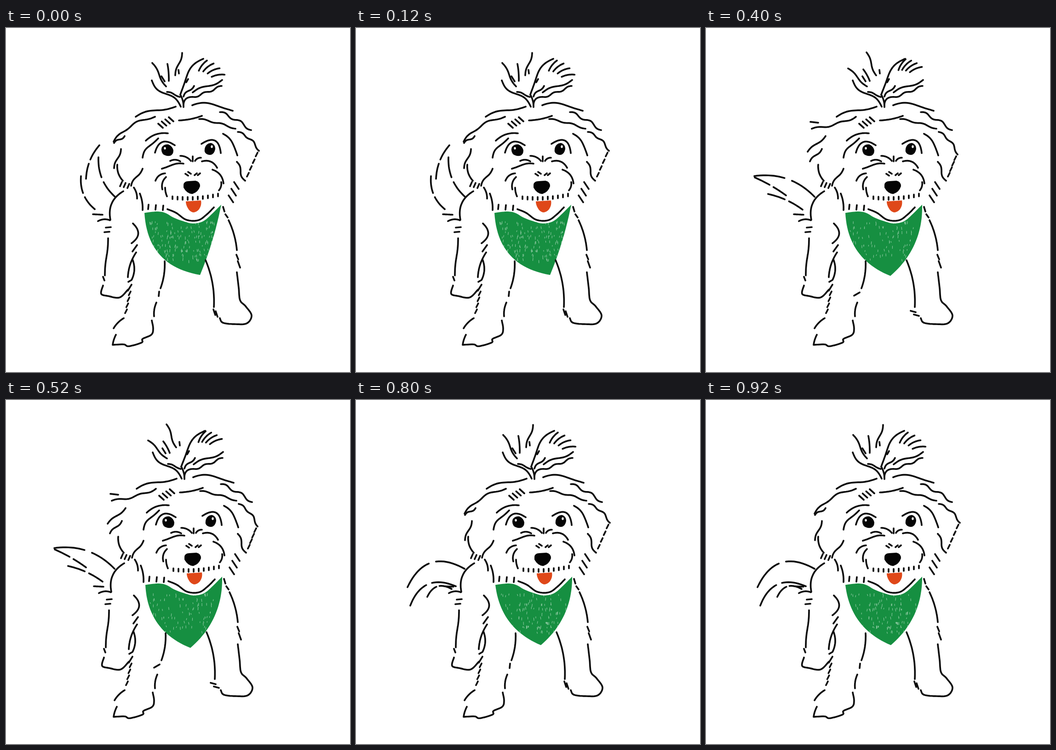
Animation of 748x748 px, one loop 1000 ms. Source, as an HTML page:

```html
<!DOCTYPE html>
<html lang="en">
<head>
<meta charset="utf-8">
<title>Dog wagging its tail</title>
<style>
html, body { margin: 0; width: 100%; height: 100%; overflow: hidden; background: #fff; }
svg { display: block; width: 100%; height: 100%; }
.ink { fill: none; stroke: #0c0c0c; stroke-width: 3.7; stroke-linecap: round; stroke-linejoin: round; }
.chalk { fill: none; stroke: #a9d8b8; stroke-width: 1.1; stroke-linecap: round; opacity: .8; }
</style>
</head>
<body>
<svg viewBox="0 0 748 748">
  <defs><clipPath id="cut"><path id="edge"/></clipPath></defs>
  <g id="dog">
    <path id="scarf" fill="#168f41"/>
    <path id="chalk" class="chalk" clip-path="url(#cut)"/>
    <path id="still" class="ink"/>
    <path id="moving" class="ink"/>
    <g fill="#050505">
      <path d="M341 259Q346 252 355 253Q364 257 366 266Q366 276 358 278Q349 279 343 274Q338 267 341 259Z"/>
      <path d="M436 257Q440 250 448 250Q457 253 457 263Q455 275 446 276Q437 276 434 269Q433 262 436 257Z"/>
      <path d="M388 341Q389 333 399 333L414 332Q424 334 424 344Q420 357 407 361Q395 360 388 347Z"/>
    </g>
    <g fill="#fff">
      <ellipse cx="347.5" cy="261.5" rx="2.2" ry="2.8"/>
      <ellipse cx="449.5" cy="258" rx="2.2" ry="3"/>
    </g>
    <path fill="#df4819" d="M393 377L426 375Q428 385 422 394Q416 401 409 401Q401 399 397 391Q393 384 393 377Z"/>
  </g>
</svg>
<script>
const el = id => document.getElementById(id);
const path = pts => "M" + pts.map(p => p.map(v => v.toFixed(1)).join(" ")).join("L");
const turn = Math.PI / 180;

// Points from one end to the other, bowed to the left of travel by `bow`,
// with `waves` ripples of height `amp`.
function line(x1, y1, x2, y2, bow = 0, waves = 0, amp = 2) {
  const dx = x2 - x1, dy = y2 - y1, len = Math.hypot(dx, dy), pts = [];
  for (let i = 0; i <= 24; i++) {
    const t = i / 24;
    const off = 4 * bow * t * (1 - t) + amp * Math.sin(2 * Math.PI * waves * t);
    pts.push([x1 + dx * t + off * dy / len, y1 + dy * t - off * dx / len]);
  }
  return pts;
}

const stroke = (...args) => path(line(...args));

// Equal ticks (dx, dy) whose starts run from one point to another.
function row(n, x1, y1, x2, y2, dx, dy, sag = 0) {
  let d = "";
  for (let i = 0; i < n; i++) {
    const t = i / (n - 1);
    const x = x1 + (x2 - x1) * t, y = y1 + (y2 - y1) * t + 4 * sag * t * (1 - t);
    d += path([[x, y], [x + dx, y + dy]]);
  }
  return d;
}

// Smooth curve through a few key points, given as "x,y x,y".
function smooth(text) {
  const p = text.split(" ").map(s => s.split(",").map(Number)), pts = [p[0]];
  for (let i = 0; i < p.length - 1; i++) {
    const a = p[i - 1] || p[i], b = p[i], c = p[i + 1], e = p[i + 2] || c;
    for (let t = 0.125; t <= 1; t += 0.125) {
      pts.push([0, 1].map(k => b[k] + t / 2 * (c[k] - a[k]
        + t * (2 * a[k] - 5 * b[k] + 4 * c[k] - e[k] + t * (3 * (b[k] - c[k]) + e[k] - a[k])))));
    }
  }
  return pts;
}

function head() {
  return stroke(319, 114, 382, 171, -1, -1, 6) + stroke(352, 139, 380, 150, 1, 1, 1)
    + stroke(381, 145, 388, 172, 2) + stroke(388, 172, 410, 150, 9)
    + stroke(410, 150, 471, 126, -1, -2) + stroke(388, 149, 411, 126, 1, 1)
    + stroke(408, 140, 472, 113, 0, 1, 3)
    + stroke(407, 168, 495, 180, 8, 1, 2.5) + stroke(378, 201, 428, 191, -2)
    + stroke(422, 198, 501, 219, 2, 2, 1.5) + stroke(467, 183, 535, 222, 3, 2, 3)
    + stroke(284, 193, 371, 171, 3, 1, 3) + row(4, 333, 208, 356, 194, 10, 9)
    + stroke(299, 306, 274, 343, -1, 1) + stroke(280, 347, 287, 371, 2)
    + stroke(293, 360, 299, 396, 2) + stroke(244, 297, 256, 332, -4)
    + row(3, 250, 344, 266, 348, 4, -9) + stroke(504, 291, 522, 332, -1, 1, 3);
}

function face() {
  return stroke(306, 245, 354, 229, 6) + stroke(299, 282, 333, 240, 5, 1)
    + stroke(326, 271, 369, 255, 16) + stroke(427, 252, 469, 272, 19)
    + stroke(474, 230, 505, 277, 6, 1, 1)
    + stroke(341, 306, 388, 295, 3, -1, 1) + stroke(359, 289, 381, 290, 3)
    + stroke(381, 278, 404, 289, 3) + stroke(408, 279, 408, 290)
    + stroke(413, 289, 426, 282, 2) + stroke(428, 290, 461, 304, 7)
    + stroke(327, 332, 348, 316, 4) + stroke(350, 324, 342, 351, -4)
    + stroke(348, 347, 352, 366, -1) + stroke(451, 308, 475, 338, 6)
    + stroke(470, 335, 465, 353, 2)
    + row(2, 392, 317, 398, 313, 6, 4) + row(2, 412, 320, 419, 320, 5, -4)
    + path(smooth("353,394 372,402 394,417 420,418 439,405 454,390"));
}

function body() {
  return stroke(257, 355, 229, 417, -12) + row(2, 219, 434, 216, 444, 11, -1)
    + stroke(224, 457, 217, 538, 0, 1, 1) + path(smooth("213,560 209,578 225,583 249,586 267,569"))
    + stroke(278, 425, 275, 468, 13) + stroke(287, 472, 277, 486)
    + stroke(285, 488, 267, 542, -4) + stroke(277, 503, 275, 548, 5)
    + stroke(268, 552, 273, 549) + stroke(275, 558, 267, 571)
    + row(4, 273, 573, 265, 612, -4, 8) + stroke(258, 631, 236, 653, -2)
    + stroke(241, 667, 234, 689, -1)
    + path(smooth("234,689 258,688 269,692 297,684 299,676 318,667 322,654 319,636"))
    + stroke(347, 507, 338, 566, 3) + stroke(329, 597, 324, 627, -2)
    + stroke(436, 505, 454, 607, 6)
    + path(smooth("467,631 474,641 502,644 526,642 536,625 523,605 511,592 508,565 504,531"))
    + stroke(486, 418, 504, 483, 3) + stroke(503, 493, 507, 503) + stroke(506, 507, 511, 521)
    + stroke(474, 389, 477, 399) + stroke(479, 405, 484, 412);
}

// Each strand has a root, a middle and a tip, with one gap along it.
function tail(strands) {
  let d = stroke(228, 418, 202, 420, -3) + stroke(212, 406, 191, 405);
  for (const [x1, y1, mx, my, x2, y2] of strands) {
    const dx = x2 - x1, dy = y2 - y1;
    const bow = ((mx - (x1 + x2) / 2) * dy - (my - (y1 + y2) / 2) * dx) / Math.hypot(dx, dy);
    const pts = line(x1, y1, x2, y2, bow);
    d += path(pts.slice(0, 11)) + path(pts.slice(13));
  }
  return d;
}

function tuft({ left, top, peak, fan }) {
  const [lx, ly] = left, [n, from, to] = fan;
  let d = stroke(350, 127, lx, ly, 0, 1) + stroke(370, 103, ...top, 0, 1)
    + stroke(381, 145, ...peak, 11, -1, 3)
    + stroke(lx + 33, ly + 2, 356, 115, 1) + stroke(340, 105, 347, 116)
    + stroke(377, 91, 378, 99) + stroke(398, 111, 394, 118);
  for (let i = 0; i < n; i++) {
    const a = from + (to - from) * i / (n - 1);
    const at = (r, deg) => [405 + r * Math.cos(deg * turn), 125 - r * Math.sin(deg * turn)];
    d += stroke(...at(64 + 4 * i, a), ...at(36 + 4 * i, a + 5), -2);
  }
  return d;
}

function ears({ top, mid, low, stray, flap, lean }) {
  const [x, y, bow] = top, [fx, fy] = flap;
  return stroke(326, 193, x, y, bow, 2, 2) + stroke(260, 235, ...mid, 0, 1)
    + stroke(252, 263, ...low, 0, 1) + (stray ? stroke(...stray, stray[0] + 17, stray[1] + 2) : "")
    + stroke(506, 226, fx, fy, 6, 2, 2)
    + row(4, fx - 3, fy + 4, 530, 315, -4, 8)
    + row(3, 498, 335, 486, 364, 10 - lean, 15);
}

// Fur that hangs straight or is blown aside.
function fur({ lean, flat }) {
  return row(10, 364 + lean / 2, 366, 463 + lean / 2, 360, -lean, 6, 4)
    + row(3, 312, 384, 344, 386, -1 - lean / 2, 10)
    + (flat ? row(2, 445, 615, 452, 623, 11, 3) + stroke(334, 575, 322, 582)
            : row(2, 453, 612, 458, 616, 4, 12) + stroke(335, 573, 334, 583))
    + stroke(213 - lean / 2, 541, 216, 549);
}

function scarf([x, y, left, right]) {
  const top = smooth("470,384 449,405 431,420 410,425 390,421 366,412 348,402 330,399 303,402");
  return path([...line(303, 402, x, y, left), ...line(x, y, 470, 384, right), ...top]) + "Z";
}

// Short chalk gaps, in loose rows.
function chalk(seed, count) {
  const rnd = () => (seed = seed * 16807 % 2147483647) / 2147483647;
  let d = "";
  for (let i = 0; i < count; i++) {
    const x = 312 + rnd() * 146, y = 420 + Math.floor(rnd() * 9) * 10 + rnd() * 5;
    d += path([[x, y], [x + rnd() * 2 - 1, y + 2 + rnd() * 4]]);
  }
  return d;
}

const rest = { top: [236, 247, -10], mid: [237, 250], low: [237, 305], flap: [552, 267], lean: 0 };
const upTuft = { left: [320, 76], top: [385, 54], peak: [431, 67], fan: [4, 58, 18] };

const poses = [
  { ...rest, ...upTuft, dx: -2, tip: [424, 537, -36, -4], gaps: 170,
    tail: [[239, 367, 211, 328, 203, 281], [176, 328, 183, 292, 205, 255], [195, 394, 172, 365, 165, 322]] },
  { left: [310, 84], top: [361, 54], peak: [407, 63], fan: [5, 75, 17],
    top: [237, 222, 1], mid: [221, 268], low: [234, 292], stray: [225, 231], flap: [541, 278],
    crest: [361, 54], lean: 6, flat: true, tip: [410, 539, -25, -18], gaps: 110,
    tail: [[236, 367, 205, 329, 169, 290], [196, 350, 165, 318, 139, 276], [200, 393, 166, 362, 140, 331]] },
  { left: [309, 88], peak: [433, 67], fan: [4, 63, 32], crest: [349, 53],
    top: [230, 219, 4], mid: [221, 269], low: [226, 290], stray: [227, 204], flap: [547, 275],
    lean: 0, flat: true, tip: [401, 539, -27, -20], gaps: 95,
    tail: [[236, 367, 188, 332, 105, 322], [174, 364, 140, 342, 106, 325], [210, 395, 170, 372, 135, 361]] },
  { left: [316, 90], peak: [420, 67], fan: [4, 65, 27], crest: [356, 57],
    top: [232, 213, 3], mid: [228, 277], low: [234, 297], flap: [552, 267],
    lean: 0, tip: [410, 537, -26, -16], gaps: 110,
    tail: [[236, 367, 183, 341, 112, 345], [180, 379, 143, 373, 94, 361], [213, 405, 172, 389, 140, 404]] },
  { ...upTuft, ...rest, tip: [402, 533, -24, -19], gaps: 130,
    tail: [[236, 367, 175, 350, 112, 407], [217, 405, 165, 397, 118, 447], [208, 411, 175, 406, 155, 428]] }
];

const drawn = poses.map((p, i) => ({
  dx: p.dx || 0,
  ink: tail(p.tail) + tuft({ ...p, top: p.crest || upTuft.top }) + ears({ ...p, top: p.crest ? p.top : rest.top }) + fur(p),
  scarf: scarf(p.tip),
  chalk: chalk(7919 * (i + 1), p.gaps)
}));

el("still").setAttribute("d", head() + face() + body());

let shown = -1;
function show(ms) {
  const i = Math.floor(ms % 1000 / 200);
  if (i === shown) return;
  shown = i;
  const p = drawn[i];
  el("dog").setAttribute("transform", `translate(${p.dx} 0)`);
  el("moving").setAttribute("d", p.ink);
  el("scarf").setAttribute("d", p.scarf);
  el("edge").setAttribute("d", p.scarf);
  el("chalk").setAttribute("d", p.chalk);
}

let start;
function tick(now) {
  if (start === undefined) start = now;
  show(Math.max(0, now - start));
  requestAnimationFrame(tick);
}
show(0);
requestAnimationFrame(tick);
</script>
</body>
</html>
```
